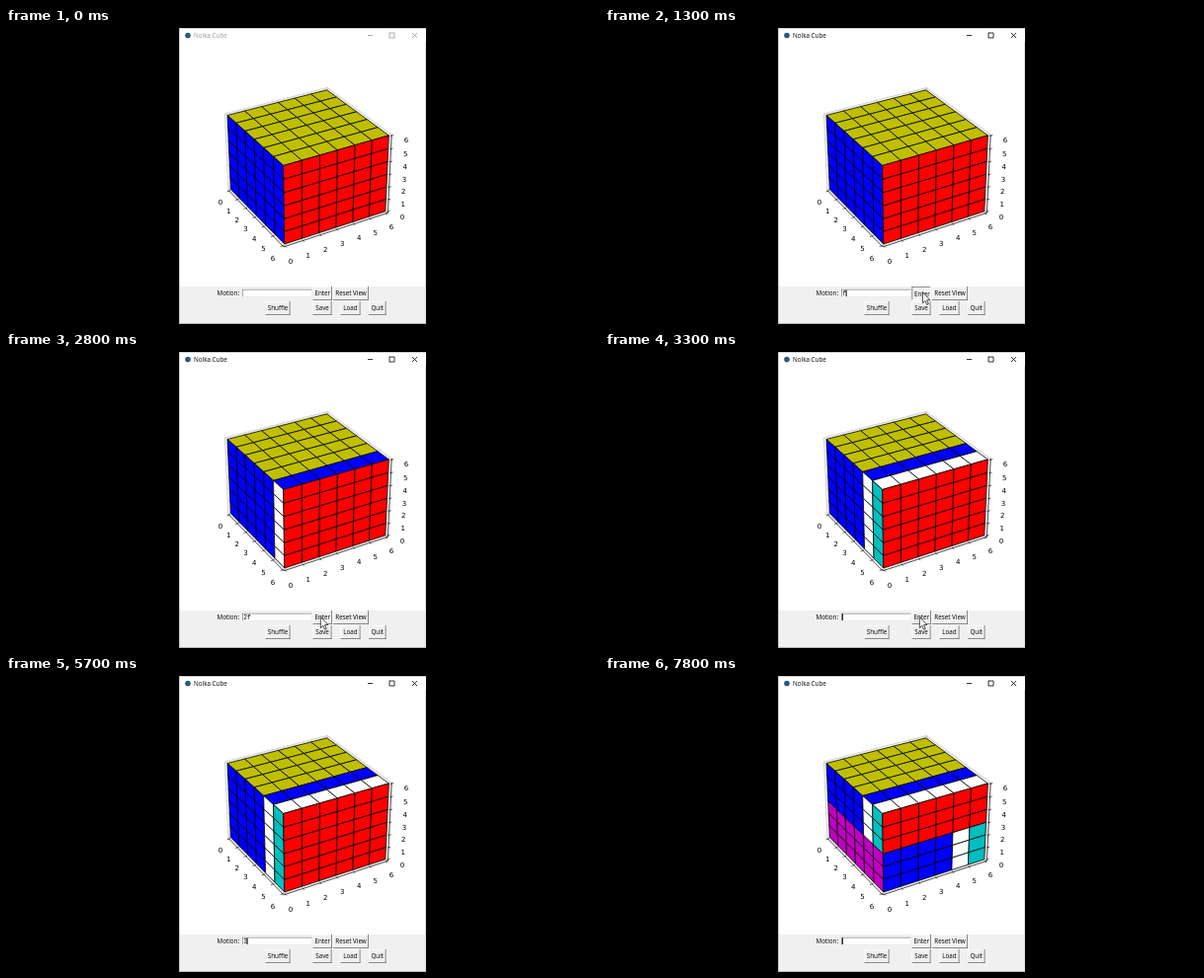
An HTML page with a canvas that plays this animation: 600x300 px, repeating every 8 s.

```html
<!DOCTYPE html>
<html>
<head>
<meta charset="utf-8">
<title>Cube viewer</title>
<style>
html, body { margin: 0; width: 600px; height: 300px; overflow: hidden; background: #000; }
canvas { display: block; }
</style>
</head>
<body>
<canvas id="stage" width="600" height="300"></canvas>
<script>
const ctx = document.getElementById('stage').getContext('2d');
const LOOP = 8000;
const UI = '6.3px "Open Sans", "Noto Sans", sans-serif';
const ENTRY = '6.3px "Liberation Mono", monospace';
const PLOT = '7px "DejaVu Sans", sans-serif';
const COLORS = { y: '#bfbf00', r: '#f00', b: '#00f', m: '#bf00bf', c: '#00bfbf', w: '#fff' };

// Layer colours from back to front after each motion
const TOP = ['yyyyyy', 'yyyyyb', 'yyyybw', 'yyyybw'];
const LEFT = ['bbbbbb', 'bbbbbw', 'bbbbwc', 'bbbbwc'];
const TURNS = [1500, 3100, 6600];
const PRESSES = [[1200, 1400], [2900, 3000], [6400, 6500]];
const TYPING = [[0, ''], [800, 'f'], [1500, ''], [2000, '2'], [2300, '2f'], [3100, ''],
  [5300, '3'], [5800, '3d'], [6600, '']];
// Pointer visits: time, x, y
const VISITS = [
  [[1000, 311, 269], [1250, 321.4, 267.8], [1600, 321.4, 267.8], [1800, 311, 268]],
  [[2400, 311, 267], [2600, 318.3, 268.6], [3400, 318.3, 268.6], [3650, 315, 271], [3750, 311, 270]],
  [[6300, 311, 268], [6400, 315, 271], [6800, 315, 271], [7000, 311, 270]]
];
// Tick labels per axis: screen position of 0 and 6, depth ratio between them
const LABELS = [[217, 176.6, 270, 233, 1.09], [288, 236, 390, 201.8, 0.95], [401, 191, 405, 113.7, 1.03]];
const LO = -0.1, HI = 6.1;

// Camera at azimuth -30, elevation 30, distance 10
function project([x, y, z]) {
  const a = (x / 3 - 1) * 0.5714, b = (y / 3 - 1) * 0.5714, c = (z / 3 - 1) * 0.4286;
  const k = 1023 / (10 - 0.75 * a + 0.433 * b - 0.5 * c);
  return [304.2 + k * (0.5 * a + 0.866 * b), 137.3 - k * (-0.433 * a + 0.25 * b + 0.866 * c)];
}

function poly(points, fill, stroke, width = 1) {
  ctx.beginPath();
  points.forEach(p => ctx.lineTo(...p));
  if (fill) { ctx.closePath(); ctx.fillStyle = fill; ctx.fill(); }
  if (stroke) { ctx.strokeStyle = stroke; ctx.lineWidth = width; ctx.stroke(); }
}

const shape = (points, ...style) => poly(points.map(project), ...style);

function rect(x, y, w, h, color) {
  ctx.fillStyle = color;
  ctx.fillRect(x, y, w, h);
}

// Box with light and dark edges
function bevel(x, y, w, h, fill, upper, lower) {
  rect(x, y, w, h, fill);
  rect(x, y, w, 0.7, upper);
  rect(x, y, 0.7, h, upper);
  rect(x, y + h - 0.8, w, 0.8, lower);
  rect(x + w - 0.8, y, 0.8, h, lower);
}

function text(s, x, y, color = '#000', font = UI, align = 'left') {
  ctx.font = font;
  ctx.textAlign = align;
  ctx.fillStyle = color;
  ctx.fillText(s, x, y);
}

function drawAxes() {
  const panes = [(u, v) => [LO, u, v], (u, v) => [u, HI, v], (u, v) => [u, v, LO]];
  for (const at of panes) {
    shape([at(LO, LO), at(HI, LO), at(HI, HI), at(LO, HI), at(LO, LO)], '#f8f8f8', '#bbb', 0.6);
    for (let i = 0; i <= 6; i++) {
      shape([at(i, LO), at(i, HI)], null, '#ccc', 0.5);
      shape([at(LO, i), at(HI, i)], null, '#ccc', 0.5);
    }
  }
  const axes = [(i, d) => [i, LO - d, LO], (i, d) => [HI + d, i, LO], (i, d) => [HI, HI + d, i]];
  axes.forEach((at, n) => {
    shape([at(LO, 0), at(HI, 0)], null, '#000', 0.6);
    const [x0, y0, x1, y1, ratio] = LABELS[n];
    for (let i = 0; i <= 6; i++) {
      const f = i / (i + ratio * (6 - i));
      shape([at(i, -0.07), at(i, 0.13)], null, '#000', 0.6);
      text(i, x0 + (x1 - x0) * f, y0 + (y1 - y0) * f + 2.6, '#000', PLOT, 'center');
    }
  });
}

function drawCube(turn) {
  const face = (at, color) => {
    for (let i = 0; i < 6; i++)
      for (let j = 0; j < 6; j++) {
        const a = at(i, j);
        shape([a, at(i + 1, j), at(i + 1, j + 1), at(i, j + 1), a], COLORS[color(i, j)], '#000', 0.8);
      }
  };
  const low = j => turn === 3 && j < 3;
  face((x, y) => [x, y, 6], x => TOP[turn][x]);
  face((x, z) => [x, 0, z], (x, z) => low(z) ? 'm' : LEFT[turn][x]);
  face((y, z) => [6, y, z], (y, z) => low(z) ? LEFT[turn][y] : 'r');
}

function button(label, x, y, w, pressed) {
  const d = pressed ? 0.7 : 0;
  bevel(x, y, w, 14, '#f0f0f0', pressed ? '#696969' : '#fff', pressed ? '#fff' : '#707070');
  text(label, x + w / 2 + d, y + 9.2 + d, '#000', UI, 'center');
}

function drawWindow(active) {
  const ink = active ? '#000' : '#999';
  rect(175, 0, 250, 300, '#fff');
  rect(175, 262, 250, 38, '#f0f0f0');
  rect(175, 0, 250, 0.6, '#b4c4cc');
  rect(175, 0, 0.7, 300, '#aaa');
  rect(424, 14, 1, 286, '#cfdde6');
  rect(175, 299, 250, 1, '#bbb');
  ctx.beginPath();
  ctx.arc(184, 7.5, 2.8, 0, 7);
  ctx.fillStyle = '#2b5878';
  ctx.fill();
  text('Nolka Cube', 190, 9.7, ink);
  poly([[366, 7.5], [371, 7.5]], null, ink, 0.8);
  poly([[388, 5], [393, 5], [393, 10], [388, 10], [388, 4.6]], null, ink, 0.8);
  poly([[411, 5], [416, 10]], null, ink, 0.8);
  poly([[416, 5], [411, 10]], null, ink, 0.8);
}

function drawControls(t) {
  const typed = TYPING.filter(k => k[0] <= t).pop()[1];
  text('Motion:', 213.5, 271);
  bevel(239, 264.8, 71, 8, '#fff', '#808080', '#e8e8e8');
  text(typed, 240.3, 271.2, '#000', ENTRY);
  if (t >= 300 && t % 900 >= 300)
    rect(239.8 + ctx.measureText(typed).width, 265.4, 1, 6.6, '#000');
  button('Enter', 310.5, 262, 19.5, PRESSES.some(([a, b]) => t >= a && t < b));
  button('Reset View', 331, 262, 36);
  button('Shuffle', 262.5, 277, 25);
  button('Save', 310.5, 277, 19);
  button('Load', 338.5, 277, 20);
  button('Quit', 367, 277, 17.5);
}

function drawPointer(t) {
  const path = VISITS.find(v => t >= v[0][0] && t < v[v.length - 1][0]);
  if (!path) return;
  const i = path.findIndex(k => k[0] > t);
  const [ta, xa, ya] = path[i - 1], [tb, xb, yb] = path[i];
  const f = (t - ta) / (tb - ta);
  const x = xa + (xb - xa) * f, y = ya + (yb - ya) * f;
  const arrow = [[0, 0], [0, 11], [2.5, 8.7], [4.3, 12.6], [6, 11.8], [4.3, 8], [7.6, 8], [0, 0]];
  poly(arrow.map(([dx, dy]) => [x + dx, y + dy]), '#fff', '#000', 0.7);
}

function frame() {
  const t = performance.now() % LOOP;
  rect(0, 0, 600, 300, '#000');
  drawWindow(t >= 200);
  drawAxes();
  drawCube(TURNS.filter(s => s <= t).length);
  drawControls(t);
  drawPointer(t);
  requestAnimationFrame(frame);
}
ctx.lineJoin = 'round';
frame();
</script>
</body>
</html>
```
